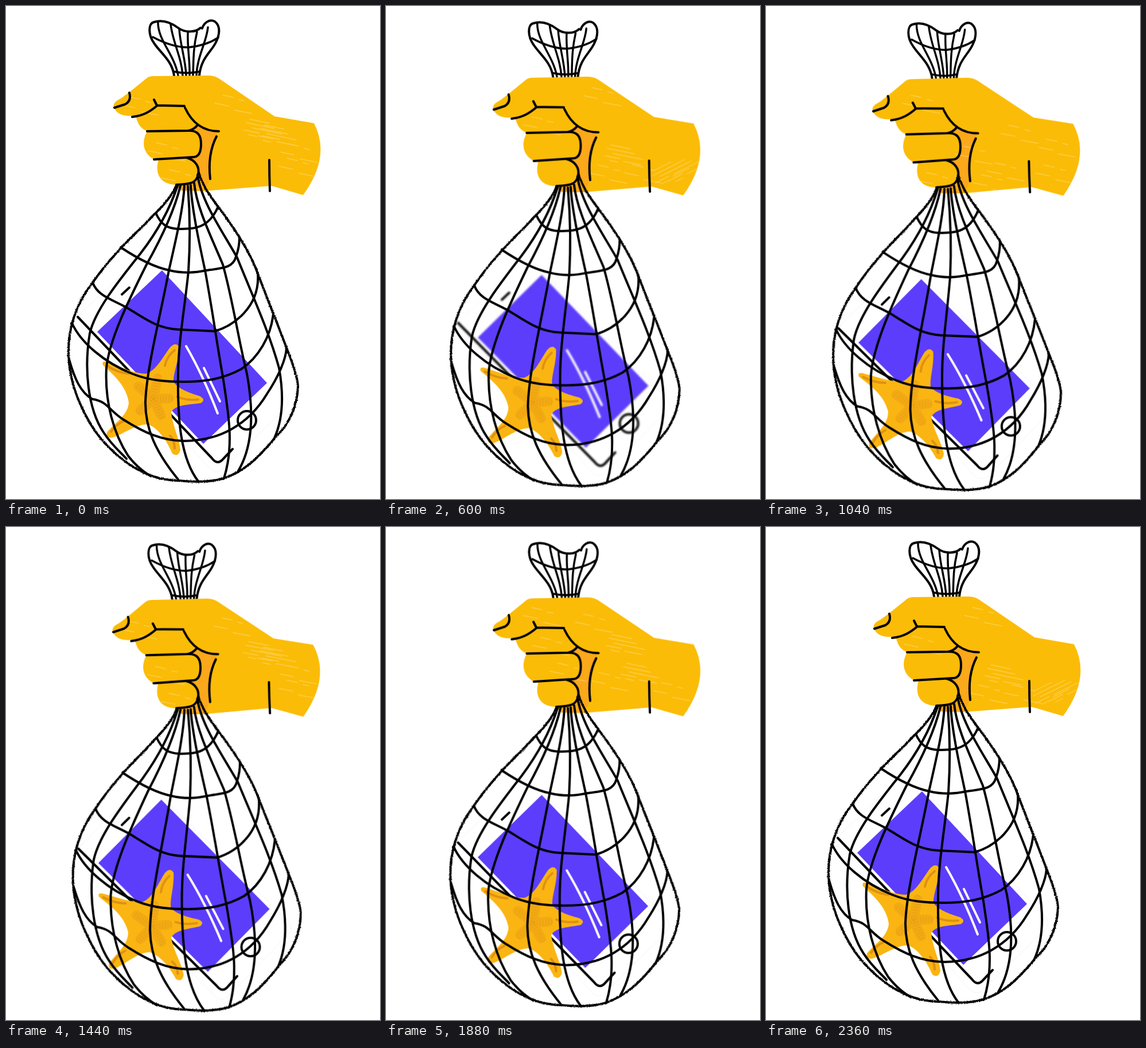
An HTML page without scripts that plays this animation: 652x858 px, repeating every 2.4 s.

```html
<!DOCTYPE html>
<html lang="en">
<head>
<meta charset="utf-8">
<title>Net bag</title>
<style>
  html, body { margin: 0; width: 100%; height: 100%; overflow: hidden; background: #fff; }
  svg { display: block; width: 652px; height: 858px; }
  .line { fill: none; stroke: #000; stroke-width: 4; stroke-linecap: round; stroke-linejoin: round; }
  .thin { stroke-width: 3.5; }
  .sway { animation: 1200ms cubic-bezier(.37, 0, .63, 1) infinite alternate; }
  .hand { transform-origin: 600px 310px; animation-name: hand; }
  .tuft { transform-origin: 0 0; animation-name: tuft; }
  .net { transform-origin: 0 0; animation-name: net; }
  .phone { transform-origin: 307px 611px; animation-name: phone; }
  .star { transform-origin: 257px 685px; animation-name: star; }
  @keyframes hand { to { transform: rotate(-.92deg); } }
  @keyframes tuft { from { transform: matrix(1, 0, 0, 1, 0, 0); } to { transform: matrix(.966, 0, 0, 1.01, 6.4, 4); } }
  @keyframes net { from { transform: matrix(1, 0, 0, 1, 0, 0); } to { transform: matrix(.989, -.005, .0215, 1.0183, -3.2, 1.7); } }
  @keyframes phone { to { transform: translate(3.6px, 14.8px) rotate(-1.9deg); } }
  @keyframes star { to { transform: translate(-1.9px, 12.3px) rotate(-5.55deg); } }

  .smear { animation: smear 2400ms step-end infinite; }
  @keyframes smear { 0%, 26.667% { filter: none; } 25% { filter: blur(1.6px); } }

  .grain { fill: none; stroke: #fdd567; stroke-width: 1.3; stroke-linecap: round; animation: 2400ms step-end infinite; opacity: 0; }
  .g1 { animation-name: g1; }
  .g2 { animation-name: g2; }
  .g3 { animation-name: g3; }
  .g4 { animation-name: g4; }
  @keyframes g1 { 0%, 53.333% { opacity: .7; } 10%, 68.333% { opacity: 0; } }
  @keyframes g2 { 0%, 20%, 88.333% { opacity: 0; } 10%, 68.333% { opacity: .7; } }
  @keyframes g3 { 0%, 33.333% { opacity: 0; } 20%, 88.333% { opacity: .7; } }
  @keyframes g4 { 0%, 53.333% { opacity: 0; } 33.333% { opacity: .7; } }
</style>
</head>
<body>
<svg viewBox="0 0 652 858">
  <defs>
    <path id="palm" d="M188 177C186 169 192 165 200 161L215 150 246 125Q250 122 257 122L352 121Q363 121 371 126L468 192 537 204Q567 262 518 329L463 313 345 322 305 321 297 311C272 311 258 295 266 267L258 267C238 256 236 236 246 218Q231 212 227 194L220 191Q196 193 188 177Z"/>
    <clipPath id="inside"><use href="#palm"/></clipPath>
    <path id="hatch" d="M0 0l34 7M-6 6l48 10M4 15l52 11M-10 19l26 5M22 29l30 6M-2 27l14 3"/>
    <path id="flecks" d="M0 0l18 4M28 8l9 2M-14 14l24 5M20 26l30 6"/>
    <filter id="rough" x="-5%" y="-5%" width="110%" height="110%">
      <feTurbulence type="fractalNoise" baseFrequency=".5" numOctaves="2" seed="4"/>
      <feDisplacementMap in="SourceGraphic" scale="3" xChannelSelector="R" yChannelSelector="G"/>
    </filter>
  </defs>

  <g class="sway tuft line thin">
    <path stroke-width="4" d="M293 121C290 96 270 82 259 66C247 50 248 30 258 28C274 23 289 30 300 38C312 47 331 46 339 38M342 39C345 29 355 22 364 27C375 35 372 51 366 63C358 80 340 90 337 121"/>
    <path d="M256 54C280 67 300 72 318 72C338 70 355 65 370 55M292 114Q315 119 338 114"/>
    <path d="M265 29C265 60 294 85 300 121M287 31C290 62 306 88 308 121M302 40C304 70 313 92 314 121M317 46C316 75 321 96 320 121M333 45C326 75 327 96 326 121M352 37C350 62 333 88 332 121"/>
  </g>

  <g class="sway hand">
    <use href="#palm" fill="#fbbc07"/>
    <g clip-path="url(#inside)">
      <path fill="#fba81a" d="M334 207Q350 218 370 218L367 227C355 250 353 275 356 301L345 322H300L297 311C320 310 333 308 335 293Q337 273 318 264L328 263C345 255 343 220 328 215Z"/>
      <g class="grain g1">
        <use href="#hatch" x="425" y="197"/><use href="#hatch" x="450" y="207"/>
        <use href="#flecks" x="378" y="155"/><use href="#flecks" x="215" y="158"/>
        <use href="#flecks" x="492" y="240"/><use href="#flecks" x="262" y="238"/>
        <use href="#flecks" x="285" y="285"/><use href="#flecks" x="490" y="265"/>
      </g>
      <g class="grain g2">
        <use href="#hatch" x="395" y="186"/><use href="#hatch" x="420" y="236"/>
        <use href="#flecks" x="255" y="138"/><use href="#flecks" x="345" y="150"/>
        <use href="#flecks" x="372" y="252"/><use href="#flecks" x="480" y="270"/>
        <use href="#flecks" x="270" y="190"/><use href="#flecks" x="300" y="235"/>
      </g>
      <g class="grain g3">
        <use href="#hatch" transform="translate(466 286)rotate(-38)"/><use href="#hatch" transform="translate(490 282)rotate(-38)"/>
        <use href="#hatch" x="392" y="240"/><use href="#flecks" x="360" y="140"/>
        <use href="#flecks" x="255" y="190"/><use href="#flecks" x="370" y="275"/>
        <use href="#flecks" x="430" y="275"/>
      </g>
      <g class="grain g4">
        <use href="#flecks" x="425" y="205"/><use href="#flecks" x="490" y="230"/>
        <use href="#flecks" x="255" y="150"/><use href="#flecks" x="345" y="240"/>
        <use href="#flecks" x="400" y="270"/><use href="#flecks" x="375" y="290"/>
        <use href="#flecks" x="280" y="285"/><use href="#flecks" x="485" y="275"/>
      </g>
    </g>
    <g class="line">
      <path d="M189 177L208 171Q219 165 215 151M220 193C240 191 252 183 264 173L311 174M258 163L263 173"/>
      <path d="M312 177C325 205 345 218 371 218M246 218L318 217Q328 215 334 207"/>
      <path d="M318 217C335 216 340 226 340 240C340 255 335 263 326 263L258 267"/>
      <path d="M315 264C330 268 338 280 335 293C332 309 320 310 297 311M367 227C355 250 353 275 356 301M459 268Q459 295 460 322"/>
    </g>
  </g>

  <g class="smear">
    <g class="sway phone">
      <path fill="#fff" stroke="#d5daf2" stroke-dasharray="1 2" d="M131 534L232 438Q246 427 260 440L487 678Q496 689 487 700L378 806Q366 816 354 804L131 552Q124 543 131 534Z"/>
      <path fill="#5c3dfb" d="M272 460L455 656 344 762 159 567Z"/>
      <g class="line">
        <path d="M125 541L359 787Q368 799 377 790L395 771M202 502L215 490"/>
        <circle cx="420" cy="721" r="16"/>
        <path stroke="#fff" d="M314 592C335 628 354 670 369 709M345 630L373 688"/>
      </g>
    </g>
  </g>

  <g class="sway star">
    <path fill="#fab512" d="M287 593Q297 584 302 594C301 620 291 640 292 654Q300 668 338 679Q349 685 340 691C320 694 298 693 288 706C290 730 303 755 304 773Q300 786 290 779C280 755 265 735 248 728C225 728 205 745 186 751Q173 753 176 742C190 725 213 712 214 690C210 660 185 640 169 625Q166 615 180 621C205 630 225 640 244 640C262 635 275 608 287 593Z"/>
    <g fill="none" stroke="#df9014" stroke-linecap="round">
      <path stroke-width="4" d="M294 599Q280 610 277 626M335 685Q315 687 298 680M294 770Q294 756 286 748M183 741Q192 728 206 722M176 626Q194 638 214 640"/>
      <path stroke-width="17" opacity=".3" stroke-linejoin="round" d="M264 648L257 684 284 683M257 684L270 712M257 684L234 704M257 684L231 662"/>
      <path stroke-width="10" stroke-dasharray="1 4" stroke-linecap="butt" opacity=".5" d="M266 642L257 684 292 684M257 684L273 717M257 684L230 708M257 684L226 659"/>
    </g>
  </g>

  <g class="sway net line">
    <path filter="url(#rough)" d="M297 312C285 340 262 358 240 382C210 410 178 443 152 480C120 520 108 565 109 605C110 665 140 722 167 755C200 792 245 825 300 826C330 829 360 828 380 822C415 810 442 785 470 750C490 732 508 700 509 662C508 645 500 622 489 595C478 565 452 500 439 466C430 440 410 405 385 370C365 342 345 320 336 290"/>
    <path d="M299 313C285 355 262 395 235 430C195 480 155 530 146 570C136 630 142 700 170 742C185 765 198 775 210 788"/>
    <path d="M304 313C295 350 276 395 245 450C215 510 180 580 175 630C172 690 188 745 213 783Q230 805 252 818"/>
    <path d="M311 313C309 350 300 390 284 460C268 545 245 630 243 690C243 735 260 775 300 824"/>
    <path d="M317 313C320 350 322 400 318 462C311 530 301 580 300 640C299 715 303 785 335 827"/>
    <path d="M322 312C324 350 334 400 347 460C360 530 368 590 378 645C388 710 398 765 380 822"/>
    <path d="M328 308C332 350 357 400 378 450C395 510 405 580 420 640C432 705 431 765 405 809"/>
    <path d="M334 294C340 340 378 393 403 438C430 505 458 565 476 630C485 680 482 722 467 754"/>
    <path d="M261 360C270 380 280 387 300 388C330 388 353 387 370 349M200 420C230 440 260 455 285 460C310 466 330 464 350 460C380 456 396 455 401 436Q407 420 407 402"/>
    <path d="M151 481C160 506 187 511 214 527C245 546 265 561 300 563L364 566C395 557 443 525 439 466M115 552C130 585 170 620 220 640C250 652 280 654 310 654C350 654 380 648 410 632C440 612 462 575 466 535"/>
    <path d="M110 615C120 650 130 672 150 684C178 688 180 705 205 720C240 742 270 756 310 757C370 757 422 730 455 675C475 645 488 615 489 595"/>
  </g>
</svg>
</body>
</html>
```
